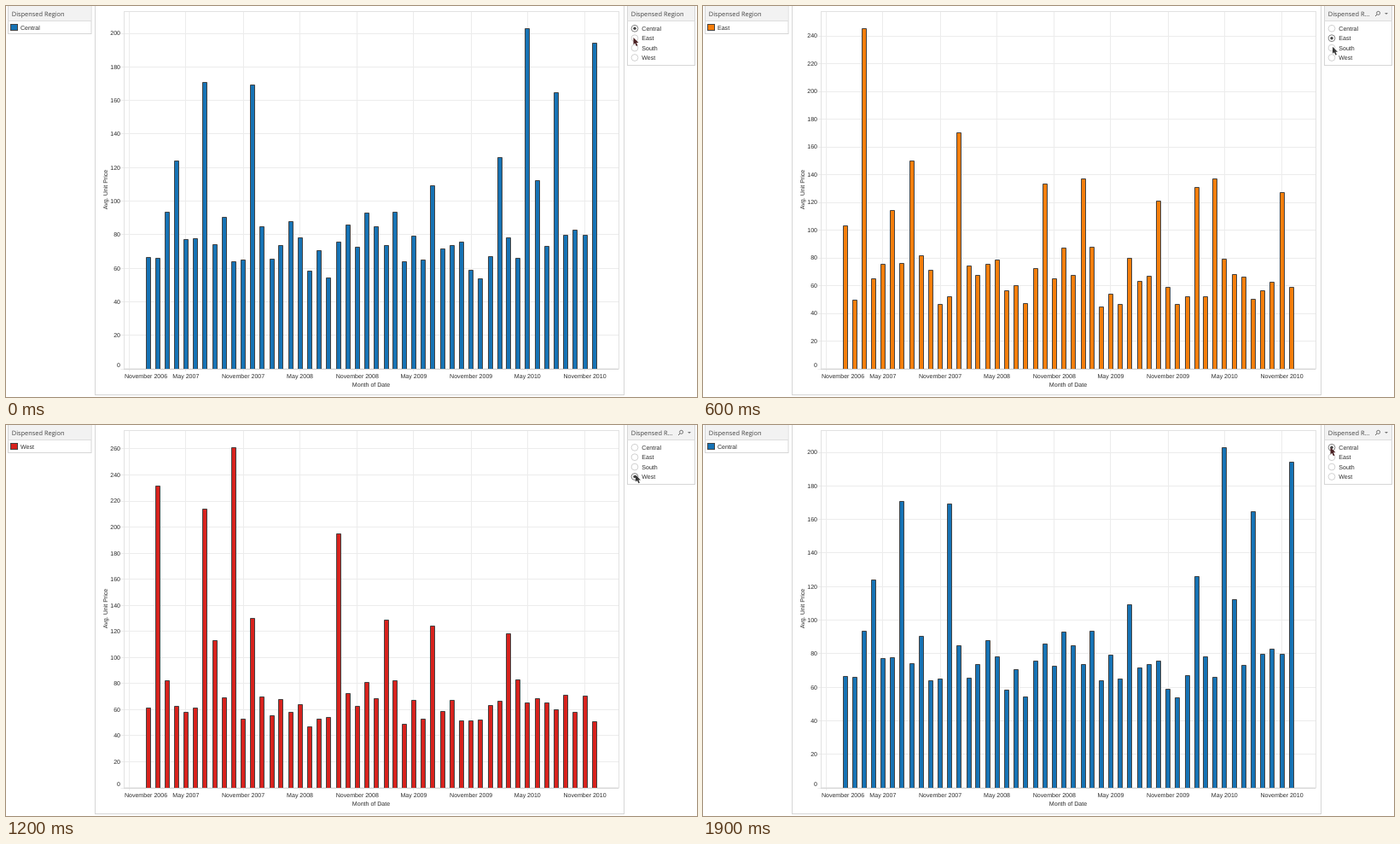
These frames come from a looping animation (810 px wide and 458 px high, 2000 ms). An HTML page:

```html
<!DOCTYPE html>
<html lang="en">
<head>
<meta charset="utf-8">
<title>Average unit price by region</title>
<style>
html, body { margin: 0; width: 100%; height: 100%; overflow: hidden; background: #fff; }
svg { display: block; width: 810px; height: 458px; }
text { font: 7.05px "Liberation Sans", Arial, sans-serif; fill: #2c2c2c; text-rendering: geometricPrecision; }
.title { font: 7.4px "Open Sans", sans-serif; fill: #444; }
</style>
</head>
<body>
<svg id="stage" viewBox="0 0 810 458"></svg>
<script>
// scale: pixels per unit; mean and spread: ordinary months; peaks: month index to value
const regions = [
  { name: 'Central', color: '#1673b5', scale: 1.965, step: 20, last: 200, mean: 73, spread: 22,
    peaks: { 3: 124, 6: 170.5, 11: 169, 30: 109, 37: 126, 40: 203, 41: 112, 43: 164.4, 47: 194 } },
  { name: 'East', color: '#f67e0c', scale: 1.625, step: 20, last: 240, mean: 66, spread: 26,
    peaks: { 0: 103, 2: 245.5, 5: 114, 7: 150, 12: 170, 21: 133, 25: 137, 33: 121, 37: 131, 39: 137, 46: 127 } },
  { name: 'South', color: '#25a021', scale: 1.2667, step: 50, last: 300, mean: 68, spread: 28,
    peaks: { 0: 217, 2: 315, 3: 179, 9: 110, 15: 108, 34: 285, 36: 111, 45: 194, 47: 197 } },
  { name: 'West', color: '#d8221d', scale: 1.527, step: 20, last: 260, mean: 65, spread: 25,
    peaks: { 1: 231.5, 6: 214, 7: 113, 9: 261, 11: 130, 20: 195, 25: 129, 30: 124, 38: 118 } }
];

function monthlyPrices({ mean, spread, peaks }, seed) {
  const random = () => (seed = (seed * 16807) % 2147483647) / 2147483647;
  return Array.from({ length: 48 }, (_, m) => {
    const usual = mean + spread * (random() + random() - 1);
    return peaks[m] ?? usual;
  });
}
regions.forEach((r, i) => r.data = monthlyPrices(r, 7919 * (i + 1)));

const BASE = 425;
const DAY = 86400000;
const OUTLINE = '#444';
const start = Date.UTC(2007, 0, 1);
const monthX = m => 167 + (Date.UTC(2007, m, 1) - start) / DAY * 0.3654;
const snap = v => Math.floor(v) + 0.5;

const rect = (x, y, w, h, fill, stroke = 'none') =>
  `<rect x="${x}" y="${y}" width="${w}" height="${h}" fill="${fill}" stroke="${stroke}"/>`;
const path = (d, stroke, fill = 'none') => `<path d="${d}" stroke="${stroke}" fill="${fill}"/>`;
const circle = (x, y, r, fill, stroke = 'none') =>
  `<circle cx="${x}" cy="${y}" r="${r}" fill="${fill}" stroke="${stroke}" stroke-width=".9"/>`;
const text = (x, y, s, attrs = '') => `<text x="${x}" y="${y}" ${attrs}>${s}</text>`;
const middle = 'text-anchor="middle"';

function panel(x, w, h, title) {
  return rect(x, -0.5, w, h, '#fff', '#d6d6d6') +
    rect(x + 0.5, 0, w - 1, 17, '#f2f2f2') +
    path(`M${x} 17.5h${w}`, '#dedede') +
    text(x + 4.3, 12.2, title, 'class="title"');
}

function chart({ color, data, scale, step, last }) {
  let grid = '', labels = '', bars = '';
  for (let v = 0; v <= last; v += step) {
    const y = BASE - v * scale;
    grid += `M134.5 ${snap(y)}H718`;
    labels += text(134, v ? y + 2.4 : 422.7, v, 'text-anchor="end"');
  }
  for (let m = -2; m <= 46; m += 6) {
    const x = monthX(m);
    const name = m % 12 === 4 ? 'May' : 'November';
    grid += `M${snap(x)} 7V428`;
    labels += text(m < 0 ? 164 : x, 436, `${name} ${2007 + Math.floor(m / 12)}`, middle);
  }
  data.forEach((v, m) => {
    bars += `M${snap(monthX(m) - 2.4)} ${BASE}V${snap(BASE - v * scale)}h5V${BASE}`;
  });
  return rect(104.5, -0.5, 620, 456, '#fff', '#d6d6d6') +
    path(grid, '#ececec') + rect(138.5, 6.5, 580, 418.5, 'none', '#e2e2e2') +
    path(bars, OUTLINE, color) + path('M138 425.5H718', '#d4d4d4') + labels +
    text(428, 446, 'Month of Date', middle) +
    text(0, 0, 'Avg. Unit Price', `${middle} transform="translate(118.7 215) rotate(-90)"`);
}

function radio(i, picked, pressed) {
  const y = 26.3 + i * 11.4;
  return circle(737, y, 3.9, '#fff', picked || pressed ? '#777' : '#ccc') +
    (picked ? circle(737, y, 1.7, '#444') : '') +
    text(745.3, y + 2.5, regions[i].name);
}

// Pointer rests on a row, then glides to the next: [time, row]
const stops = [[0, 1], [400, 1], [600, 2], [900, 2], [1100, 3], [1400, 3], [1700, 0], [1900, 0], [2000, 1]];

function pointerRow(t) {
  const next = stops.findIndex(s => s[0] > t);
  const [t0, a] = stops[next - 1], [t1, b] = stops[next];
  return a + (b - a) * (t - t0) / (t1 - t0);
}

function pointer(t) {
  const inside = t >= 200 && t < 1700;
  const x = inside ? 738 : 735.5;
  const y = 26.3 + pointerRow(t) * 10.7;
  return `<g transform="translate(${x} ${y}) scale(.95)">` +
    path('M0 0V8.6L2 6.9L3.6 10.4L5.2 9.7L3.6 6.3H6.3Z', 'none', inside ? '#383838' : '#4a2022') + '</g>';
}

function draw(t) {
  const current = t < 1900 ? Math.floor((t + 300) / 500) : 0;
  const region = regions[Math.min(current, 3)];
  const hover = t > 0;
  const pressing = t === 100 || t === 1800;
  let out = chart(region) + panel(2.5, 97.5, 33, 'Dispensed Region') +
    rect(5.5, 21.5, 8, 7, region.color, OUTLINE) + text(17, 27.6, region.name) +
    panel(728.5, 79, 70, hover ? 'Dispensed R...' : 'Dispensed Region');
  if (hover) {
    out += circle(791.6, 8.3, 2, 'none', '#666') +
      path('M790 10l-2 2', '#666') + path('M799 8h4l-2 2z', 'none', '#777');
  }
  regions.forEach((r, i) => out += radio(i, r === region, pressing && i === pointerRow(t)));
  stage.innerHTML = out + pointer(t);
}

const stage = document.getElementById('stage');
const origin = performance.now();
let shown;
function tick() {
  const t = Math.floor((performance.now() - origin) % 2000 / 100) * 100;
  if (t !== shown) draw(shown = t);
  requestAnimationFrame(tick);
}
tick();
</script>
</body>
</html>
```
